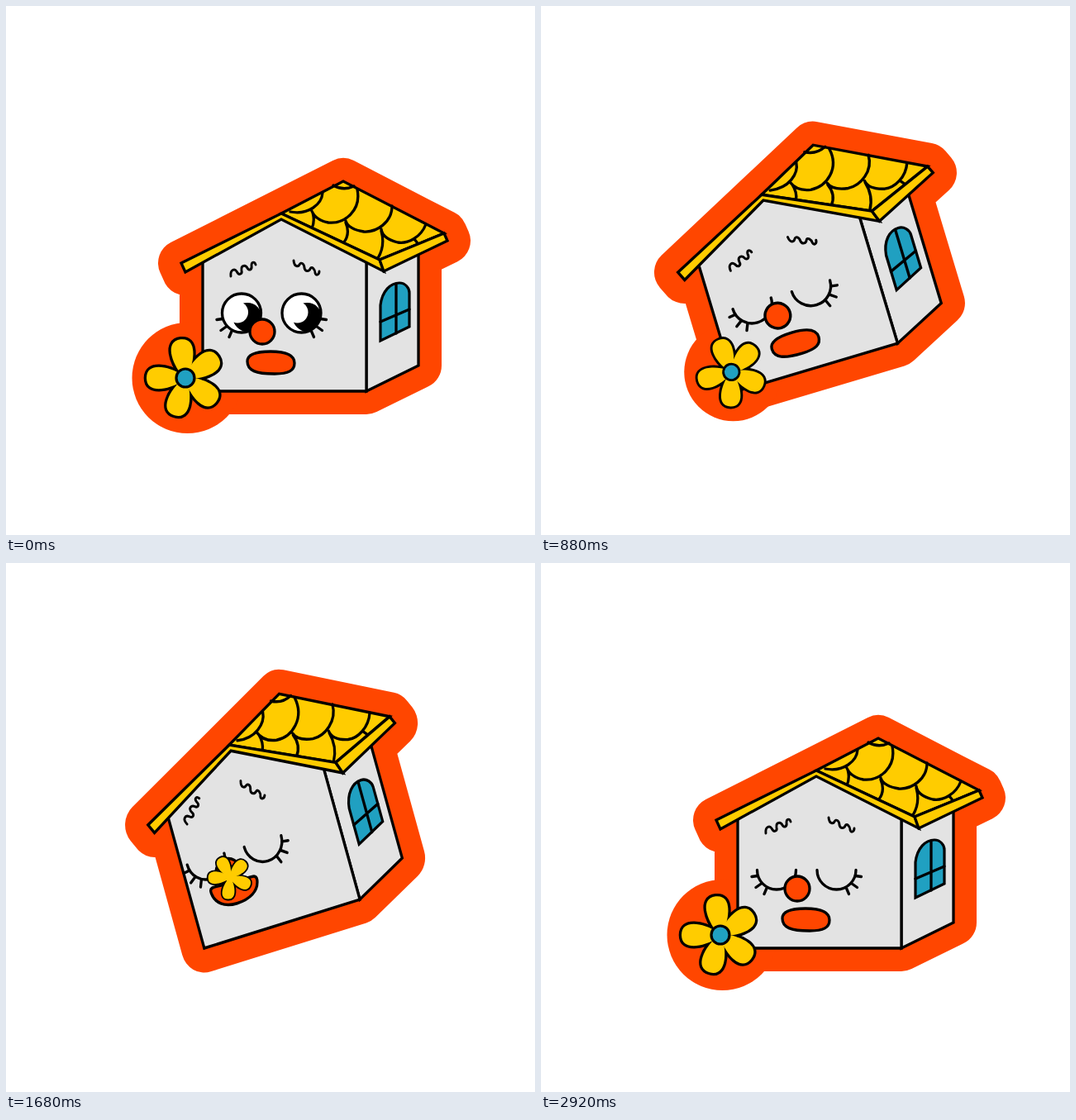
Write an HTML page that moves like this. It is 640x640 px and loops after 2960 ms.

```html
<!DOCTYPE html>
<html lang="en">
<head>
<meta charset="utf-8">
<title>House and flower</title>
<style>
html, body { margin: 0; width: 100%; height: 100%; overflow: hidden; background: #fff; }
svg { display: block; width: 100vw; height: 100vh; }
.ink { fill: none; stroke: #000; stroke-width: 3.3; stroke-linecap: round; }
.brow { stroke-width: 2.9; }
.wall { fill: #e3e3e3; stroke: #000; stroke-width: 3.3; }
.roof { fill: #fc0; stroke: #000; stroke-width: 3.3; }
.blue { fill: #20a0c1; stroke: #000; stroke-width: 3.2; }
.red { fill: #ff4600; stroke: #000; stroke-width: 3.3; }
.halo { fill: #ff4600; }
</style>
</head>
<body>
<svg viewBox="0 0 640 640">
  <defs>
    <clipPath id="eyeClip"><circle r="23.5"/></clipPath>
    <path id="petal" d="M4-4C20-14 47-20 47 0C47 20 20 14 4 4Z"/>
    <g id="petals"></g>
  </defs>

  <path id="houseHalo" class="halo" stroke="#ff4600" stroke-width="56" stroke-linejoin="round"
    d="M212 311L408 212L530 275L534 284L499 301V435L436 466H238V310L217 322Z"/>
  <circle id="flowerHalo" class="halo"/>
  <g id="ball"><circle class="halo" r="23.5"/><circle class="blue" r="11"/></g>

  <g id="house">
    <path class="wall" d="M436 466L499 435V290L436 308Z"/>
    <path class="wall" d="M238 466H436V308L333 256L238 306Z"/>
    <path class="roof" d="M333 251L408 212L530 275L452 307Z"/>
    <path class="ink" d="M396 217Q408 224 421 218
      M383 226C382 240 366 253 344 249
      M425 222C430 247 410 264 390 262C378 260 372 254 369 246
      M467 242C467 262 448 274 433 273C420 271 413 266 411 260
      M508 264C502 280 486 288 474 286C462 283 455 278 454 270
      M371 250Q374 260 370 269M411 262Q417 276 408 287M454 272Q459 290 450 305M494 282L498 287"/>
    <path class="roof" d="M212 311L333 251L452 307L457 321L333 258L217 322Z"/>
    <path class="roof" d="M452 307L530 275L534 284L457 321Z"/>
    <path class="blue" d="M453 405V362C455 345 465 335 476 335C483 335 488 341 488 347V388Z"/>
    <path class="ink" d="M472 337V396M453 382L488 367"/>
    <path id="browL" class="ink brow" d="M272 327C271 318 277 318 279 321C282 327 286 324 285 320C284 313 290 313 292 317C294 321 298 319 297 314C297 309 301 309 302 313"/>
    <path id="browR" class="ink brow" d="M348 308C349 317 354 315 355 313C357 309 361 312 361 317C362 322 367 321 368 318C370 314 374 319 374 323C375 327 379 325 379 321"/>
    <g id="eyes"></g>
    <path id="mouth" class="red"/>
    <circle id="nose" class="red" r="15"/>
  </g>

  <g id="flower">
    <use href="#petals" stroke="#000" stroke-width="6.6"/>
    <use href="#petals" fill="#fc0"/>
    <circle r="10" fill="#fc0"/>
    <circle id="core" class="blue" r="11"/>
  </g>
</svg>

<script>
const $ = id => document.getElementById(id);
const set = (id, value, name = 'transform') => $(id).setAttribute(name, value);
const LOOP = 2960, STEP = 40;

$('petals').innerHTML = [-97, -33, 38, 106, 180]
  .map(a => `<use href="#petal" transform="rotate(${a})"/>`).join('');

$('eyes').innerHTML = [[285, -1], [357.5, 1]].map(([x, side]) => `
  <g transform="translate(${x} 371.5)">
    <g class="open">
      <circle r="23.5" fill="#fff"/>
      <g clip-path="url(#eyeClip)"><circle class="pupil" r="17.5"/><circle class="shine" r="13" fill="#fff"/></g>
      <circle class="ink" r="23.5"/>
    </g>
    <path class="shut ink" d="M-23.5 0A23.5 23.5 0 0 0 23.5 0"/>
    <path class="ink" stroke-linecap="butt" transform="scale(${side} 1)" d="M23 7L30 8M18 16L25 21M12 22L15 29"/>
  </g>`).join('');

// Smooth progress from a to b; bend skews it early (<1) or late (>1).
function ease(t, a, b, bend = 1) {
  const u = Math.min(1, Math.max(0, (t - a) / (b - a))) ** bend;
  return u * u * (3 - 2 * u);
}
const mix = (a, b, p) => a + (b - a) * p;

const calm = [292, 430, 292, 422, 300, 418, 320, 418, 339, 418, 349, 423, 349, 432,
  349, 441, 342, 445, 325, 445, 302, 445, 292, 441, 292, 430];
const smile = [264, 408, 263, 400, 268, 402, 292, 404, 314, 405, 323, 400, 322, 409,
  320, 422, 307, 428, 291, 428, 275, 428, 265, 420, 264, 408];

function pose(t) {
  const tilt = ease(t, 600, 1200, .7);
  const angle = 26.5 * (tilt - ease(t, 1400, 1960, 1.25));
  const squash = 1 + .11 * ease(t, 440, 600) - .17 * tilt
    + .17 * ease(t, 1580, 1960) - .11 * ease(t, 1980, 2120);
  const grow = 1 + .00137 * angle;
  return { angle, sx: grow * squash, sy: grow / squash, dx: .065 * angle };
}

// Where a point of the upright house appears on the stage.
function place(x, y, { angle, sx, sy, dx }) {
  const r = angle * Math.PI / 180, c = Math.cos(r), s = Math.sin(r);
  x -= 238; y -= 466;
  return [326 + dx + (x * c + y * s - 88) * sx, 466 + (y * c - x * s) * sy];
}

function drawFace(t) {
  const f = ease(t, 900, 1160) - ease(t, 2040, 2320);
  const look = ease(t, 0, 320);
  const shut = t >= 640;
  const all = (name, fn) => document.querySelectorAll('.' + name).forEach(fn);
  all('open', e => e.style.display = shut ? 'none' : '');
  all('shut', e => e.style.display = shut ? '' : 'none');
  const move = (name, x, y) => all(name, e => e.setAttribute('transform', `translate(${x} ${y})`));
  move('pupil', mix(7, -5, look), 5);
  move('shine', mix(-5, -14, look), mix(-1, 6, look));

  const browY = f * mix(2, -8, ease(t, 1240, 1640));
  set('browL', `translate(${-18 * f} ${browY}) rotate(${-22 * f} 286 319)`);
  set('browR', `translate(${-18 * f} ${browY}) rotate(${23 * f} 364 317)`);
  set('eyes', `translate(${-16.5 * f} ${-3 * f})`);
  const sniff = ease(t, 1000, 1180) - ease(t, 1300, 1600);
  set('nose', `translate(${310 - 19 * f} ${394 - 4 * f}) scale(${1 - .4 * sniff})`);
  const [x, y, ...rest] = calm.map((v, i) => mix(v, smile[i], f));
  set('mouth', `M${x} ${y}C${rest.join(' ')}Z`, 'd');
}

function drawFlower(t, house) {
  const back = t > 1700;
  const p = back ? 1 - ease(t, 2040, 2760, .8) : ease(t, 720, 1200);
  const [nx, ny] = place(291, 397, house);
  const x = mix(217, nx, p);
  const y = mix(450, ny, p) + (back ? 24 : 14) * Math.sin(Math.PI * p);
  const size = back ? mix(.56, 1, Math.min(1, (1 - p) * 1.4)) : mix(1, .56, p);
  set('flower', `translate(${x} ${y}) rotate(${-84 * p ** 1.3}) scale(${size})`);
  set('flowerHalo', `translate(${x + 2.5 * size} ${y}) scale(${size})`);
  set('flowerHalo', p > .97 ? 0 : 67, 'r');
  const core = back ? ease(t, 2080, 2280) : 1 - ease(t, 1000, 1140);
  set('core', `scale(${core})`);
  $('core').style.display = core ? '' : 'none';
}

function drawBall(t) {
  const u = (t - 1050) / 320;
  const out = u > 0 && u < 1;
  $('ball').style.display = out ? '' : 'none';
  if (!out) return;
  const p = Math.sin(Math.PI * u);
  set('ball', `translate(${mix(370, 461, p)} ${mix(270, 191, p)})`);
}

function draw(now) {
  const t = Math.floor(now % LOOP / STEP) * STEP;
  const house = pose(t);
  const { angle, sx, sy, dx } = house;
  const move = `translate(${326 + dx} 466) scale(${sx} ${sy}) translate(-326 -466) rotate(${-angle} 238 466)`;
  set('house', move);
  set('houseHalo', move);
  drawFace(t);
  drawFlower(t, house);
  drawBall(t);
}

let start;
function tick(now) {
  start ??= now;
  draw(now - start);
  requestAnimationFrame(tick);
}
draw(0);
requestAnimationFrame(tick);
</script>
</body>
</html>
```
